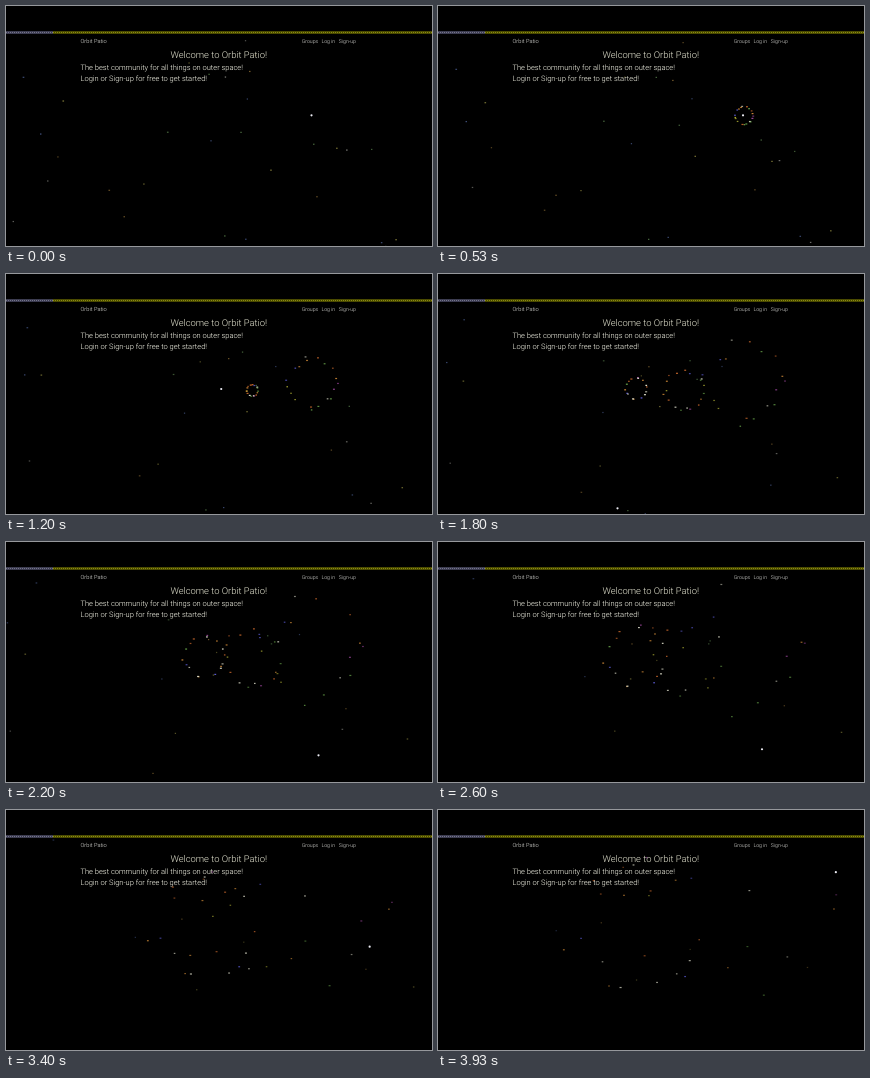
Write an HTML page with a canvas that moves like this. It is 426 px wide and 240 px high and loops after 3990 ms.

```html
<!DOCTYPE html>
<html lang="en">
<head>
<meta charset="utf-8">
<title>Orbit Patio</title>
<style>
  html, body { margin: 0; width: 100%; height: 100%; overflow: hidden; background: #000; }
  canvas, svg { position: absolute; left: 0; top: 0; width: 426px; height: 240px; }
  text { font-family: Roboto, Inter, sans-serif; font-weight: 300; fill: #fffff0; text-rendering: geometricPrecision; }
  .nav { font-size: 5.2px; fill: #e4e4e0; }
  .body { font-size: 7.5px; }
  .title { font-size: 9.4px; fill: #e8e8d4; text-anchor: middle; }
</style>
</head>
<body>
<canvas id="sky" width="426" height="240"></canvas>
<svg viewBox="0 0 426 240">
  <path d="M0 26.5H47" stroke="#3c3c50" stroke-width="3"/>
  <path d="M47 26.5H426" stroke="#4a4a00" stroke-width="3"/>
  <g stroke-dasharray="1 1">
    <path d="M0 26.5H47" stroke="#74748c"/>
    <path d="M47 26.5H426" stroke="#8c8c10"/>
  </g>
  <text class="nav" x="74.5" y="37.2" style="font-size:5.7px">Orbit Patio</text>
  <text class="nav" x="295.7" y="37">Groups</text>
  <text class="nav" x="315.4" y="37">Log in</text>
  <text class="nav" x="332.8" y="37">Sign-up</text>
  <text class="title" x="212.8" y="51.7">Welcome to Orbit Patio!</text>
  <text class="body" x="74.5" y="63.5">The best community for all things on outer space!</text>
  <text class="body" x="74.5" y="74.5">Login or Sign-up for free to get started!</text>
</svg>
<script>
const LOOP = 3990, STEP = 200 / 3;
const WIDTH = 426, HEIGHT = 240, TOP = 28;
const DIM = ['#a8a04a', '#608a52', '#90908a', '#a07c3c', '#50649a'];
const VIVID = ['#f0a040', '#f0f0dc', '#6868f0', '#d87030', '#c8c83c', '#70b050', '#b050b0'];
const ctx = document.getElementById('sky').getContext('2d');

// Pointer stops: time, x, y.
const pointer = [
  [0, 305, 109], [530, 305, 109], [950, 245.5, 116], [1340, 197.5, 114],
  [1800, 179, 234], [2200, 312, 213], [2930, 333, 202], [LOOP, 401, 54]
];

function generator(seed) {
  return () => (seed = (seed * 16807) % 2147483647) / 2147483647;
}
const rnd = generator(48271);
const between = (a, b) => a + rnd() * (b - a);
const pick = list => list[Math.floor(rnd() * list.length)];
const make = (count, build) => Array.from({ length: count }, (_, i) => build(i));

const stars = make(30, () => ({
  born: 0, x: between(0, WIDTH), y: between(TOP, HEIGHT),
  angle: between(0, Math.PI * 2), speed: between(14, 30), spread: 0,
  turn: between(-0.35, 0.35), life: between(0.6, 6),
  size: between(1.2, 1.7), glow: between(0.55, 0.9), color: pick(DIM)
}));

// A ring that opens evenly, then loosens as its parts turn and drift.
const burst = (born, x, y, count) => make(count, i => ({
  born, x, y,
  angle: (i + between(-0.7, 0.7)) / count * Math.PI * 2,
  speed: between(23, 25), spread: between(-3, 2),
  turn: between(-0.2, 0.2), life: between(1.4, 5),
  size: between(1.5, 2.1), glow: between(0.65, 1), color: pick(VIVID)
}));

const particles = [
  ...stars,
  ...burst(160, 305, 109, 19),
  ...burst(960, 245.5, 116, 17),
  ...burst(1360, 197.5, 114, 16)
];

function drawParticle(p, t) {
  const age = (t - p.born) / 1000;
  if (age < 0 || age > p.life) return;
  const angle = p.angle + p.turn * age;
  const r = p.speed * age + p.spread * age * age;
  ctx.globalAlpha = p.glow * (1 - 0.12 * age);
  ctx.fillStyle = p.color;
  ctx.fillRect(p.x + Math.cos(angle) * r, p.y + Math.sin(angle) * r, p.size, 1.2);
}

function pointerAt(t) {
  const next = pointer.findIndex(stop => stop[0] > t);
  const [t0, x0, y0] = pointer[next - 1];
  const [t1, x1, y1] = pointer[next];
  const u = (t - t0) / (t1 - t0);
  return [x0 + (x1 - x0) * u, y0 + (y1 - y0) * u];
}

function draw(t) {
  ctx.clearRect(0, 0, WIDTH, HEIGHT);
  ctx.save();
  ctx.beginPath();
  ctx.rect(0, TOP, WIDTH, HEIGHT - TOP);
  ctx.clip();
  particles.forEach(p => drawParticle(p, t));

  const [x, y] = pointerAt(t);
  ctx.globalAlpha = 1;
  ctx.fillStyle = '#ececf4';
  ctx.beginPath();
  ctx.arc(x + 0.5, y + 0.3, 1.1, 0, Math.PI * 2);
  ctx.fill();
  ctx.restore();
}

const start = performance.now();
function tick() {
  const t = (performance.now() - start) % LOOP;
  draw(Math.floor((t + 4) / STEP) * STEP);
  requestAnimationFrame(tick);
}
tick();
</script>
</body>
</html>
```
